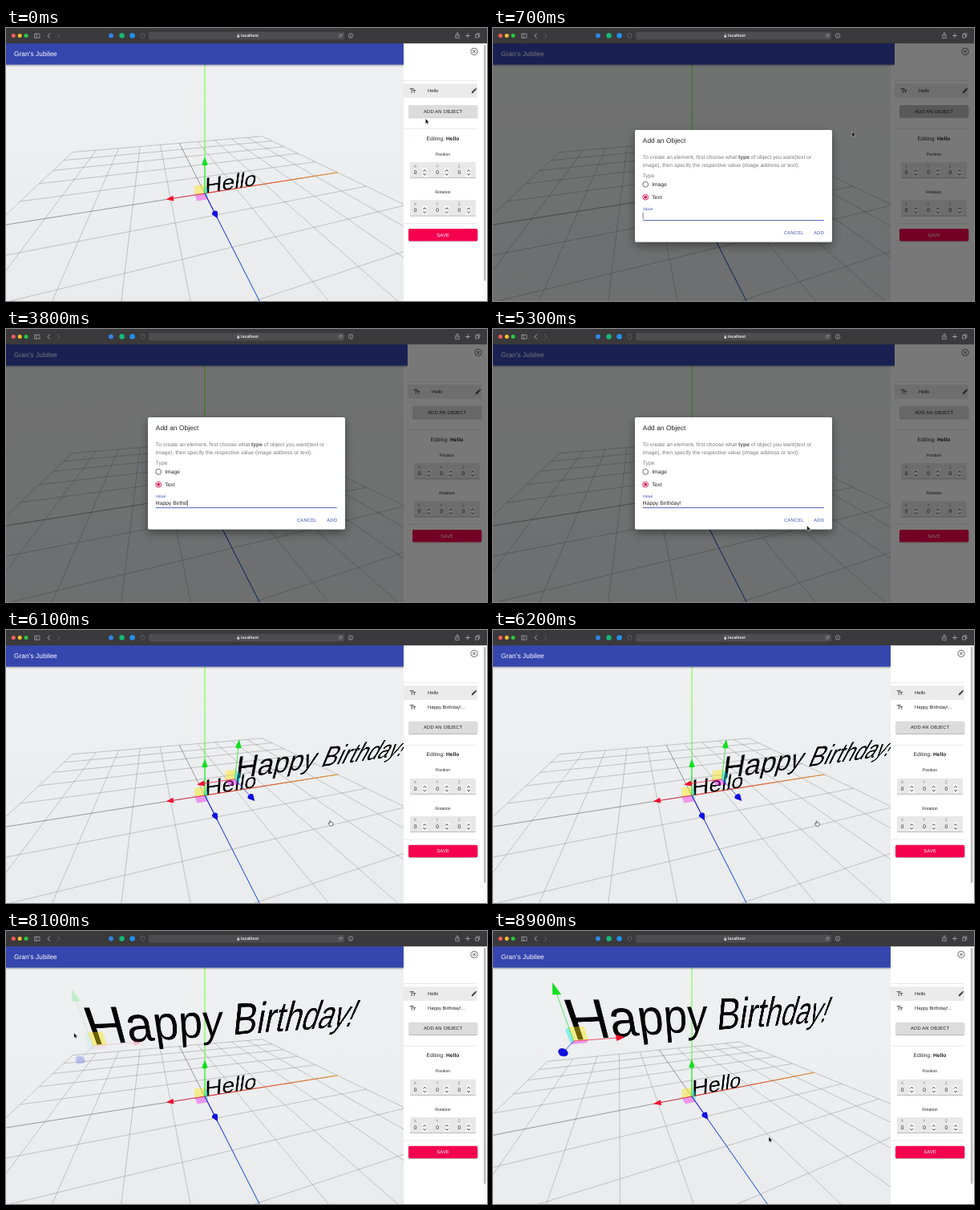
These frames come from a looping animation (600 px wide and 340 px high, 9 s). An HTML page with a canvas:

```html
<!DOCTYPE html>
<html lang="en">
<head>
<meta charset="utf-8">
<title>Scene editor</title>
<style>
html, body { margin: 0; width: 100%; height: 100%; overflow: hidden; background: #fff; }
#stage { position: relative; width: 600px; height: 340px; overflow: hidden; background: #fff; }
#scene { position: absolute; left: 0; top: 0; width: 496px; height: 340px; overflow: hidden;
  background: linear-gradient(#eff1f2, #e9ebec); }
#scene canvas, #stage > svg { position: absolute; left: 0; top: 0; }
.word { position: absolute; left: 0; top: 0; font: 60px/1 "Liberation Sans", Arial, sans-serif;
  color: #050505; white-space: pre; transform-origin: 0 0; }
svg text { font-family: "Liberation Sans", Arial, sans-serif; text-rendering: geometricPrecision; }
.mid { text-anchor: middle; }
.btn { font-size: 5.83px; letter-spacing: .16px; }
.body { font-size: 6.67px; letter-spacing: .04px; }
.small { font-size: 5.83px; }
.tiny { font-size: 5px; }
.line { fill: none; stroke-linecap: round; stroke-linejoin: round; }
</style>
</head>
<body>
<div id="stage">
  <div id="scene">
    <canvas id="floor" width="496" height="340"></canvas>
    <div class="word" id="hello">Hello</div>
    <div class="word" id="happy">Happy Birthday!</div>
    <canvas id="tools" width="496" height="340"></canvas>
  </div>
  <svg id="ui" width="600" height="340" viewBox="0 0 600 340"></svg>
</div>
<script>
const $ = id => document.getElementById(id);
const clamp = x => Math.min(1, Math.max(0, x));
const span = (t, a, b) => clamp((t - a) / (b - a));
const smooth = x => x * x * (3 - 2 * x);
const mix = (a, b, k) => a + (b - a) * k;

// ---------- interface ----------
const text = (x, y, str, cls, fill = '#222', extra = '') =>
  `<text x="${x}" y="${y}" class="${cls}" fill="${fill}" ${extra}>${str}</text>`;
const rect = (x, y, w, h, fill, rx = 0) =>
  `<rect x="${x}" y="${y}" width="${w}" height="${h}" fill="${fill}" rx="${rx}"/>`;
const dot = (x, y, r, fill) => `<circle cx="${x}" cy="${y}" r="${r}" fill="${fill}"/>`;
const ring = (x, y, r, stroke, w) =>
  `<circle cx="${x}" cy="${y}" r="${r}" fill="none" stroke="${stroke}" stroke-width="${w}"/>`;
const line = (d, stroke, w = .7) =>
  `<path class="line" d="${d}" stroke="${stroke}" stroke-width="${w}"/>`;
const rule = y => rect(496, y, 92, .6, '#dedede');
const typeIcon = y => line(`M504 ${y - 2.3}h4.4M506.2 ${y - 2.3}v4.8M507.8 ${y - .4}h3M509.3 ${y - .4}v2.9`, '#555', 1);

const field = (name, x, y) =>
  text(x, y + 6.6, name, 'tiny mid', '#777') +
  text(x, y + 15.2, '0', 'body mid') +
  rect(x + 8.8, y + 7.6, 6, 10.6, '#fdfdfd', 1.8) +
  line(`M${x + 10.2} ${y + 11.3}l1.6 -1.7 1.6 1.7M${x + 10.2} ${y + 14.6}l1.6 1.7 1.6 -1.7`, '#222', .9);
const fields = y => rect(504, y, 82, 20, '#e8e8e8', 1.2) + rect(504, y + 19.6, 82, .5, '#8e8e8e') +
  field('X', 510.5, y) + field('Y', 538, y) + field('Z', 565.3, y);

const browserBar = rect(0, 0, 600, 19.2, '#3a393b') +
  dot(9.3, 9.5, 2.5, '#ff5f57') + dot(17.2, 9.5, 2.5, '#febc2e') + dot(25.1, 9.5, 2.5, '#28c840') +
  line('M36 7.2h6v5h-6zM38 7.2v5', '#c4c4c6', .6) +
  line('M54.4 7l-2.3 2.6 2.3 2.6', '#c9c9cb', .8) + line('M64.6 7l2.3 2.6-2.3 2.6', '#757577', .8) +
  dot(131, 9.5, 2.9, '#2f86e6') + dot(144.6, 9.5, 3.2, '#17b978') + dot(157.6, 9.5, 3.3, '#2490ea') +
  line('M170.5 6.8l2.3 .9v2q0 1.9-2.3 3-2.3-1.1-2.3-3v-2z', '#7a7a7c', .6) +
  rect(178, 4.7, 244, 9.8, '#4d4c4e', 2.2) +
  rect(288.4, 9.2, 2.8, 2.5, '#dcdcdc', .4) + line('M289 9.2v-.8a.8 .8 0 0 1 1.6 0v.8', '#dcdcdc', .5) +
  text(293, 11.4, 'localhost', 'tiny', '#f2f2f2', 'font-weight="600"') +
  line('M418.9 8.9a1.9 1.9 0 1 0 .1 1.2M419.2 7.6v1.4h-1.4', '#c4c4c6', .5) +
  ring(430, 9.5, 2.8, '#c4c4c6', .6) + line('M430 9.3v1.7M430 8v.1', '#c4c4c6', .6) +
  line('M561.8 8.6h-1.1v4h4.6v-4h-1.1M563 10.6v-4.6M561.8 7.1l1.2-1.2 1.2 1.2', '#c4c4c6', .6) +
  line('M573.5 9.5h5M576 7v5', '#c4c4c6', .7) +
  line('M587 8.3v-1.5h3.8v3.8h-1.2M586 8.3h3.6v3.8h-3.6z', '#c4c4c6', .6);

const panel = rect(496, 19, 110, 321, '#fff') +
  ring(584, 29.3, 4.1, '#333', .7) + line('M582.3 27.6l3.4 3.4M585.7 27.6l-3.4 3.4', '#333', .8) +
  rule(65.4) + rect(496, 69.3, 92, 17.6, '#ebebeb') + typeIcon(78) +
  text(526, 80.1, 'Hello', 'small') +
  '<path d="M580.8 81.2v-1.5l4.1-4.1 1.5 1.5-4.1 4.1zM585.3 75.2l.7-.7 1.5 1.5-.7.7z" fill="#444"/>' +
  `<g id="item">${typeIcon(96)}${text(526, 98.1, 'Happy Birthday!...', 'small')}</g>` +
  `<g id="lower">
    <g filter="url(#lift)">${rect(502, 96, 86.3, 15.2, '#dcdcdc', 1.7)}</g>
    <g clip-path="url(#addClip)"><circle id="ripple" cx="541" cy="104" r="0" fill="#000"/></g>` +
    text(545.2, 105.7, 'ADD AN OBJECT', 'btn mid') + rule(125.2) +
    text(545, 139.8, 'Editing: <tspan font-weight="700">Hello</tspan>', 'body mid') +
    text(545, 158.8, 'Position', 'mid', '#222', 'font-size="5.2"') + fields(167) +
    text(545, 206, 'Rotation', 'mid', '#222', 'font-size="5.2"') + fields(214.2) + rule(243) +
    `<g filter="url(#lift)">${rect(502, 250, 86.3, 15.2, '#f50250', 1.7)}</g>` +
    text(545.2, 259.6, 'SAVE', 'btn mid', '#fff') +
  '</g>';

const BLUE = '#3f51b5';
const dialog = `<g filter="url(#drop)">${rect(177, 110, 246, 139.5, '#fff', 1.7)}</g>` +
  text(186.8, 126.2, 'Add an Object', '', '#222', 'font-size="8.33" letter-spacing=".06"') +
  text(186.8, 146.1, 'To create an element, first choose what <tspan font-weight="700" fill="#555">type</tspan> of object you want(text or', 'body', '#777') +
  text(186.8, 156.1, 'image), then specify the respective value (image address or text).', 'body', '#777') +
  text(186.8, 168.9, 'Type', 'body', '#777') +
  ring(190.2, 177.8, 3.4, '#555', .85) + text(198.2, 180.2, 'Image', 'body') +
  ring(190.2, 193.7, 3.4, '#d4124f', .9) + dot(190.2, 193.7, 1.9, '#d4124f') + text(198.2, 196.1, 'Text', 'body') +
  text(186.8, 209.5, 'Value', 'tiny', BLUE) +
  '<text id="typed" x="186.8" y="219.2" class="body" fill="#222" xml:space="preserve"></text>' +
  '<rect id="caret" y="212.8" width=".6" height="8" fill="#222"/>' +
  rect(186.8, 222.2, 226, .9, BLUE) +
  text(363, 240.4, 'CANCEL', 'btn', BLUE) + text(400.3, 240.4, 'ADD', 'btn', BLUE);

$('ui').innerHTML = `<defs>
  <filter id="lift" x="-10%" y="-30%" width="120%" height="180%"><feDropShadow dx="0" dy=".8" stdDeviation=".7" flood-opacity=".35"/></filter>
  <filter id="drop" x="-15%" y="-20%" width="130%" height="150%"><feDropShadow dx="0" dy="4.5" stdDeviation="6" flood-opacity=".4"/></filter>
  <filter id="bar" x="-5%" y="-30%" width="110%" height="190%"><feDropShadow dx="0" dy="1" stdDeviation="1.3" flood-opacity=".4"/></filter>
  <clipPath id="addClip"><rect x="502" y="96" width="86.3" height="15.2" rx="1.7"/></clipPath>
  </defs>
  <rect id="appbar" y="19" height="26.6" fill="#3646ae" filter="url(#bar)"/>
  ${text(10, 34.9, "Gran's Jubilee", '', '#fff', 'font-size="8.33" letter-spacing=".06"')}
  <g id="panel">${panel}</g>
  <g id="thumb">${rect(594.2, 19, 6, 321, '#fafafa')}${rect(596, 21, 2.6, 294, '#bdbdbd', 1.3)}</g>
  <rect id="shade" y="19" width="600" height="321"/>
  <g id="dialog">${dialog}</g>
  ${browserBar}
  <g id="cursor">
    <path id="arrow" d="M0 0v6.2l1.5-1.3 1 2.2 1-.5-1-2.1h2z" fill="#000" stroke="#fff" stroke-width=".4"/>
    <path id="hand" d="M-.4-1.7q.8-.8 1 .2v1.4q1.3-.3 1.6.3 1.4-.1 1.4 1v1.3q0 2-1.7 2h-1.4q-.9 0-1.6-1.3l-1.2-1.8q0-.9 1.9.1z" fill="#fff" stroke="#111" stroke-width=".6"/>
  </g>`;

// ---------- 3D scene ----------
const CX = 248, CY = 206, FOCAL = 208.5, DIST = 4.93, HALF = 5, NEAR = .1;
const floor = $('floor').getContext('2d'), tools = $('tools').getContext('2d');
const dotp = (a, b) => a[0] * b[0] + a[1] * b[1] + a[2] * b[2];
const add = (a, b, k = 1) => a.map((v, i) => v + b[i] * k);
let R, U, B;

function aim(k) {
  const az = mix(-15.8, -20.3, k) * Math.PI / 180, el = mix(33.8, 31.8, k) * Math.PI / 180;
  const s = Math.sin(az), c = Math.cos(az), se = Math.sin(el), ce = Math.cos(el);
  R = [c, 0, -s];
  U = [-s * se, ce, -c * se];
  B = [s * ce, se, c * ce];
}
const toCam = p => [dotp(R, p), dotp(U, p), DIST - dotp(B, p)];
const toScreen = ([x, y, d]) => [CX + FOCAL * x / d, CY - FOCAL * y / d];
const project = p => toScreen(toCam(p));

function segment(ctx, p, q, color, width) {
  let a = toCam(p), b = toCam(q);
  if (a[2] < NEAR && b[2] < NEAR) return;
  if (a[2] < NEAR) [a, b] = [b, a];
  if (b[2] < NEAR) b = add(a, add(b, a, -1), (a[2] - NEAR) / (a[2] - b[2]));
  ctx.strokeStyle = color;
  ctx.lineWidth = width;
  ctx.beginPath();
  ctx.moveTo(...toScreen(a));
  ctx.lineTo(...toScreen(b));
  ctx.stroke();
}

function polygon(ctx, pts, color) {
  ctx.fillStyle = color;
  ctx.beginPath();
  pts.forEach(p => ctx.lineTo(...project(p)));
  ctx.fill();
}

const unit = i => [0, 1, 2].map(j => +(j === i));
const AXIS_END = [[255, 153, 0], [153, 255, 0], [0, 153, 255]];

function drawFloor() {
  floor.clearRect(0, 0, 496, 340);
  for (let i = -HALF; i <= HALF; i++) {
    const color = i ? '#8c8c8c' : '#444', w = i ? .45 : .5;
    segment(floor, [i, 0, -HALF], [i, 0, HALF], color, w);
    segment(floor, [-HALF, 0, i], [HALF, 0, i], color, w);
  }
  for (let axis = 0; axis < 3; axis++) {
    const u = unit(axis), from = u.map(v => v * 255), steps = 25;
    for (let n = 0; n < steps; n++) {
      const c = from.map((v, j) => Math.round(mix(v, AXIS_END[axis][j], n / steps)));
      segment(floor, u.map(v => v * HALF * n / steps), u.map(v => v * HALF * (n + 1) / steps), `rgb(${c})`, .8);
    }
  }
}

const AXIS_COLOR = ['#f01030', '#10e020', '#1010e0'];
const PLANES = [[1, 2, '#00e5e5'], [0, 2, '#f020f0'], [0, 1, '#ffe600']];

function gizmo(pos, dragging) {
  const eye = add(B.map(v => v * DIST), pos, -1);
  const size = Math.hypot(...eye) * .208;
  const dir = eye.map((v, i) => unit(i).map(n => n * (v < 0 ? -1 : 1)));
  const at = (...terms) => terms.reduce((p, [axis, k]) => add(p, dir[axis], k * size), pos);

  PLANES.forEach(([a, b, color], i) => {
    tools.globalAlpha = dragging ? (i === 2 ? .4 : .06) : .42;
    polygon(tools, [[0, 0], [.295, 0], [.295, .295], [0, .295]].map(([m, n]) => at([a, m], [b, n])), color);
  });
  tools.globalAlpha = dragging ? .2 : 1;
  dir.forEach((d, i) => {
    segment(tools, pos, at([i, .95]), AXIS_COLOR[i], .7);
    const a = (i + 1) % 3, b = (i + 2) % 3, base = [];
    for (let n = 0; n < 12; n++) {
      const w = n * Math.PI / 6;
      base.push(at([i, .9], [a, .075 * Math.cos(w)], [b, .075 * Math.sin(w)]));
    }
    // one path keeps translucent cones even
    tools.fillStyle = AXIS_COLOR[i];
    tools.beginPath();
    const tip = project(at([i, 1.1])), rim = base.map(project);
    rim.forEach((p, n) => {
      const q = rim[(n + 1) % 12];
      const turn = (p[0] - tip[0]) * (q[1] - tip[1]) - (p[1] - tip[1]) * (q[0] - tip[0]);
      tools.moveTo(...tip);
      tools.lineTo(...(turn < 0 ? q : p));
      tools.lineTo(...(turn < 0 ? p : q));
      tools.closePath();
    });
    tools.fill();
  });
  tools.globalAlpha = 1;
}

const EM = .73, FONT = 60, BASE = .8465;
const column = (v, d) => [CX * d + FOCAL * dotp(R, v), CY * d - FOCAL * dotp(U, v), 0, d];

function placeWord(el, pos) {
  const k = EM / FONT, origin = add(pos, [0, BASE * EM, 0]);
  const u = [k, 0, 0], v = [0, -k, 0], depth = DIST - dotp(B, origin);
  const m = [...column(u, -dotp(B, u)), ...column(v, -dotp(B, v)), 0, 0, depth, 0, ...column(origin, depth)];
  el.style.transform = `matrix3d(${m.map(n => (n / depth).toFixed(9))})`;
}

// ---------- timeline ----------
const MESSAGE = 'Happy Birthday!';
const KEYS = [1900, 2000, 2200, 2400, 2600, 2900, 3000, 3200, 3300, 3500, 3600, 3800, 3900, 4100, 4500];
const OPEN = 500, CLOSE = 5850, DRAG = [6950, 8150];
const MOVES = [[6950, .4, 1], [7600, -.76, 1.53], [8150, -2.2, 2]];
const PATH = [[0, 523.3, 113], [350, 541, 104], [480, 541, 104], [700, 448, 129.3], [1000, 384, 182],
  [4900, 334, 232], [5300, 391.7, 245], [5650, 405, 239], [6000, 405, 239], [6200, 403.5, 240],
  [6850, 276.6, 176.7], [6950, 276.6, 176.7], [8150, 71, 124], [8450, 340, 261], [8900, 344, 256.5]];

function along(table, t, ease = x => x) {
  let i = 0;
  while (i < table.length - 2 && t >= table[i + 1][0]) i++;
  const a = table[i], b = table[i + 1], k = ease(span(t, a[0], b[0]));
  return a.slice(1).map((v, j) => mix(v, b[j + 1], k));
}

// decelerating curve, cubic-bezier(0, 0, .2, 1)
function settle(x) {
  let lo = 0, hi = 1;
  for (let i = 0; i < 20; i++) {
    const s = (lo + hi) / 2;
    if (.6 * s * s + .4 * s ** 3 < x) lo = s; else hi = s;
  }
  return smooth(lo);
}

function drawScene(t) {
  aim(smooth(span(t, 8450, 8900)));
  drawFloor();
  tools.clearRect(0, 0, 496, 340);
  placeWord($('hello'), [0, 0, 0]);
  gizmo([0, 0, 0], false);
  const added = t >= CLOSE, dragging = t >= DRAG[0] && t < DRAG[1];
  $('happy').style.display = added ? '' : 'none';
  if (!added) return;
  const pos = [...along(MOVES, t), 1];
  placeWord($('happy'), pos);
  gizmo(pos, dragging);
}

function drawPanel(t) {
  const modal = t >= OPEN && t < CLOSE + 230, added = t >= CLOSE;
  $('appbar').setAttribute('width', modal ? 501 : 496);
  $('panel').setAttribute('transform', `translate(${modal ? 5 : 0})`);
  $('thumb').style.display = modal ? 'none' : '';
  $('item').style.display = added ? '' : 'none';
  $('lower').setAttribute('transform', `translate(0 ${added ? 17.7 : 0})`);
  $('ripple').setAttribute('r', 60 * smooth(span(t, 400, 800)));
  $('ripple').style.opacity = t < 400 ? 0 : .16 * (1 - span(t, 650, 1000));
}

function drawDialog(t) {
  const shown = t >= OPEN && t < CLOSE + 210;
  const out = span(t, CLOSE, CLOSE + 210);
  const y = 230 * (1 - settle(span(t, OPEN, OPEN + 310))) + 240 * out * out;
  $('dialog').style.display = shown ? '' : 'none';
  $('dialog').setAttribute('transform', `translate(0 ${y})`);
  $('shade').style.opacity = .53 * smooth(span(t, OPEN, OPEN + 190)) * (1 - smooth(out));
  const count = KEYS.filter(k => k <= t).length;
  const typed = $('typed');
  typed.textContent = MESSAGE.slice(0, count);
  const since = t - (count ? KEYS[count - 1] : 600);
  $('caret').style.display = since % 1000 < 500 ? '' : 'none';
  $('caret').setAttribute('x', 186.8 + (count ? typed.getComputedTextLength() + .2 : 0));
}

function drawCursor(t) {
  const dragging = t >= DRAG[0] && t < DRAG[1];
  const [x, y] = dragging
    ? project(add([...along(MOVES, t), 1], [-.18, .2, 0]))
    : along(PATH, t, smooth);
  const hand = (t >= 300 && t < 520) || (t >= 5600 && t < 6300);
  $('cursor').setAttribute('transform', `translate(${x} ${y})`);
  $('cursor').style.display = t >= 1000 && t < 4900 ? 'none' : '';
  $('arrow').style.display = hand ? 'none' : '';
  $('hand').style.display = hand ? '' : 'none';
}

const start = performance.now();
function frame() {
  const t = (performance.now() - start) % 9000;
  drawScene(t);
  drawPanel(t);
  drawDialog(t);
  drawCursor(t);
  requestAnimationFrame(frame);
}
frame();
</script>
</body>
</html>
```
